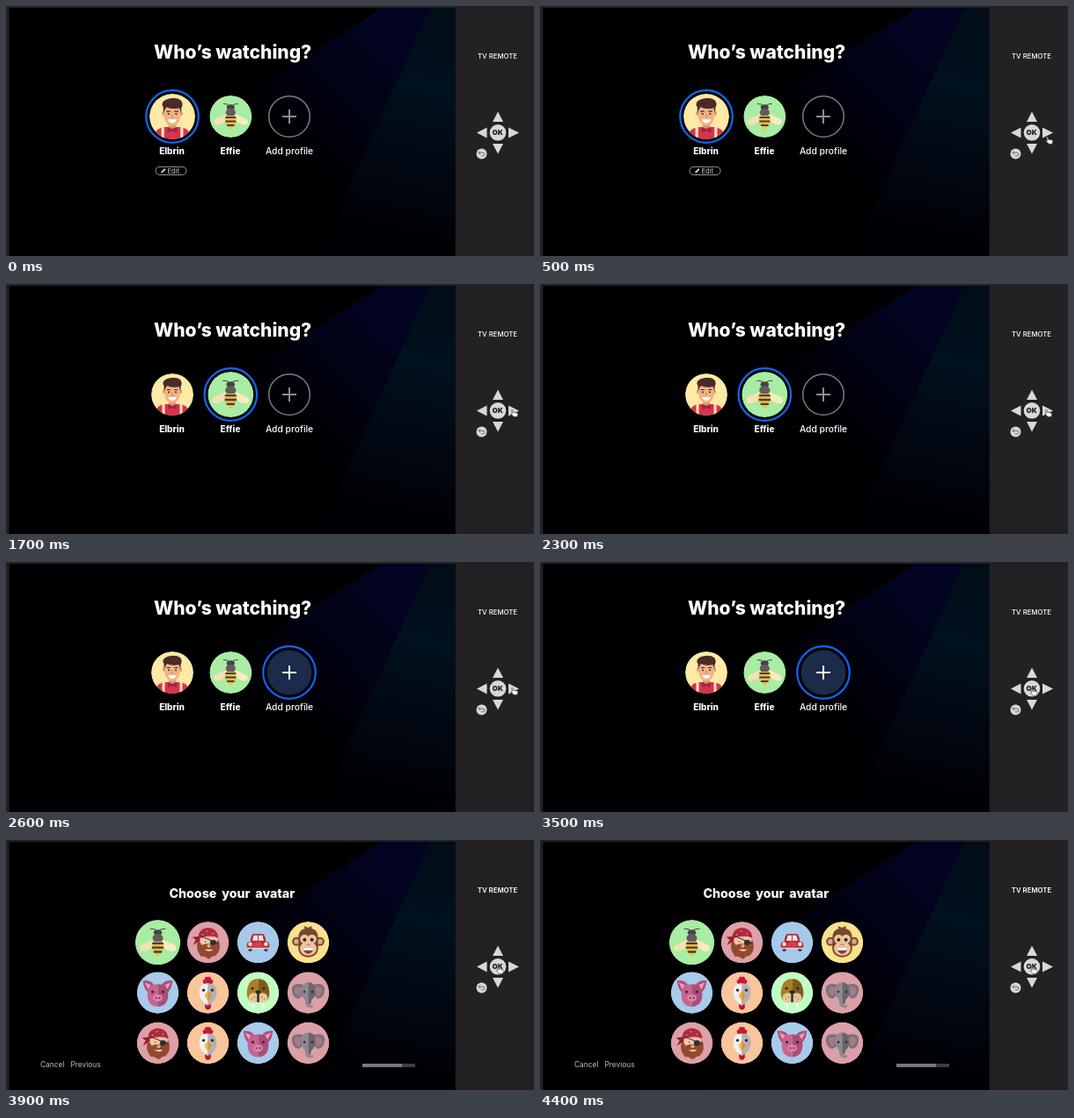
Write an HTML page that moves like this. It is 600 by 285 pixels and loops after 4500 ms.

```html
<!DOCTYPE html>
<html lang="en">
<head>
<meta charset="utf-8">
<title>Profile picker</title>
<style>
  html, body { margin: 0; width: 100%; height: 100%; overflow: hidden; background: #000; }
  svg { display: block; width: 100vw; height: 100vh; }
  text { font-family: Inter, "Open Sans", sans-serif; fill: #fff; }
  .mid { text-anchor: middle; }
  .bold { font-weight: 800; }
</style>
</head>
<body>
<svg viewBox="0 0 600 285">
  <defs>
    <clipPath id="disc"><circle r="24"/></clipPath>
    <linearGradient id="navy" gradientUnits="userSpaceOnUse" x1="455" y1="45" x2="325" y2="170">
      <stop offset="0" stop-color="#020422"/><stop offset=".45" stop-color="#010214"/><stop offset="1" stop-color="#000002"/>
    </linearGradient>
    <linearGradient id="teal" gradientUnits="userSpaceOnUse" x1="500" y1="0" x2="440" y2="270">
      <stop offset="0" stop-color="#010d19"/><stop offset=".35" stop-color="#01111d"/>
      <stop offset=".65" stop-color="#010813"/><stop offset="1" stop-color="#000004"/>
    </linearGradient>
  </defs>

  <rect width="600" height="285" fill="#232124"/>
  <rect x="3.5" y="2.3" width="507" height="283"/>
  <path d="M427 2.3H482L354 285H180L216 136Z" fill="url(#navy)"/>
  <path d="M482 2.3H510.5V285H354Z" fill="url(#teal)"/>

  <g id="profiles">
    <text class="bold" x="168" y="60" font-size="21">Who’s watching?</text>
    <g id="choices"></g>
    <text class="bold mid" x="188.5" y="169" font-size="10">Elbrin</text>
    <text class="bold mid" x="255" y="169" font-size="10">Effie</text>
    <text class="mid" x="322" y="169.3" font-size="10.3" font-weight="500">Add profile</text>
    <g id="edit">
      <rect x="170" y="183.3" width="35" height="9.2" rx="4.6" fill="none" stroke="#aaa" stroke-width=".9"/>
      <path d="M176 190.5l.6-2 3.5-3.5 1.4 1.4-3.5 3.5z" fill="#ccc"/>
      <text x="183.6" y="190.7" font-size="7.5" style="fill:#ccc">Edit</text>
    </g>
  </g>

  <g id="avatars">
    <text class="bold" x="185.5" y="66" font-size="14.2" word-spacing="2.8">Choose your avatar</text>
    <g id="grid"></g>
    <g font-size="8.4" opacity=".75"><text x="39" y="259.3">Cancel</text><text x="73.5" y="259.3">Previous</text></g>
    <path d="M405 257H465" stroke="#3d3d43" stroke-width="4"/>
    <path d="M405 257H450" stroke="#77777e" stroke-width="4"/>
  </g>

  <g id="remote" fill="#d8d8d8">
    <text id="caption" class="mid" x="558.5" y="59.5" font-size="7.8">TV REMOTE</text>
    <path d="M559 120.5l6 11.5h-12zM559 168.5l6-11.5h-12zM535 144.5l11.5-6v12zM583 144.5l-12-6v12z"/>
    <circle cx="559" cy="144.3" r="9.3"/>
    <text class="mid" x="558.7" y="147.3" font-size="8" font-weight="900" style="fill:#232124">OK</text>
    <circle cx="540.5" cy="168.5" r="6"/>
    <path d="M539 165.3l-2 2 2 2M537 167.3h5q2 0 2 1.8t-2 1.8h-2" fill="none" stroke="#555" stroke-width=".8"/>
  </g>
  <path id="cursor" d="M-3.4-4q1.2-.6 1.5.8l.5 2 4 .6q1.5.6 1 2l-.7 2.4h-4l-3-3.3q0-1.2 1.6-.4z"
        fill="#fff" stroke="#444" stroke-width=".7"/>
</svg>

<script>
const $ = id => document.getElementById(id);
const ellipse = (x, y, rx, ry, fill) => `<ellipse cx="${x}" cy="${y}" rx="${rx}" ry="${ry}" fill="${fill}"/>`;
const dot = (x, y, r, fill) => ellipse(x, y, r, r, fill);
const shape = (d, fill) => `<path d="${d}" fill="${fill}"/>`;
const line = (d, color, width = 1) =>
  `<path d="${d}" fill="none" stroke="${color}" stroke-width="${width}" stroke-linecap="round"/>`;
const box = (x, y, w, h, fill, r = 0) =>
  `<rect x="${x}" y="${y}" width="${w}" height="${h}" rx="${r}" fill="${fill}"/>`;
const pair = (x, y, r, fill) => dot(-x, y, r, fill) + dot(x, y, r, fill);

// Each portrait fills a disc of radius 24 around the origin.
const portraits = {
  man: ['#fdeaa6',
    shape('M-18 24V18Q-17 12-8 11H8Q17 12 18 18V24Z', '#d63450') +
    line('M-10 11V24M10 11V24', '#f7e3b4', 3) +
    shape('M-4 5H4V11L0 14-4 11Z', '#dc9566') + pair(9, -3, 2.2, '#e5a373') +
    shape('M-8.5-11H8.5V1Q7 9 0 10-7 9-8.5 1Z', '#f1b384') +
    shape('M-9.5-3V-10Q-13-15-6-18 4-21 9-17 12-13 9.5-9V-3L7.5-9Q0-7-6-10L-8-7Z', '#4a2a28') +
    line('M-6-5.5h3.5M2.5-5.5H6', '#4a2a28', 1.1) + pair(4, -2.8, 1, '#3a2528') +
    line('M0-2V1', '#d48c62', 1.2) + shape('M-5 3H5Q3 7 0 7-3 7-5 3Z', '#fff') +
    shape('M-5 11L0 13 5 11V17L0 15-5 17Z', '#a7233d')],
  bee: ['#a8eda3',
    shape('M-3-4L-18 3Q-21 6-18 9-11 11-4 3Z', '#f3e3b2') +
    shape('M3-4L18 3Q21 6 18 9 11 11 4 3Z', '#f8ebc2') +
    line('M-1.5-12Q-3-15-8-14.5M1.5-12Q3-15 8-14.5', '#474249', 1) +
    ellipse(0, -10.5, 4.5, 3.2, '#474249') + ellipse(0, -4.5, 5.6, 4.6, '#625c5c') +
    shape('M-5.5-1H5.5Q8 6 4 11L0 15-4 11Q-8 6-5.5-1Z', '#efc040') +
    line('M-5 1H5M-5.2 5.5H5.2M-3.4 10H3.4', '#453e43', 2.2)],
  pirate: ['#dd9fa8',
    shape('M-9-6H10V6H-9Z', '#f2c6a0') +
    shape('M-11-3L-7 3Q0 0 8 3L12-3Q15 6 12 11L9 15 5 16 1 19-4 16-8 16-11 11Q-14 5-11-3Z', '#94492c') +
    shape('M-11-4Q-12-15-1-17 11-17 12-5Q2-10-11-4Z', '#b02a3c') +
    shape('M-10-7L-18-6-14-3-17 3-9-2Z', '#96202f') +
    [[-6, -9], [-1, -13], [6, -10]].map(([x, y]) => dot(x, y, .9, '#d9808a')).join('') +
    line('M-8-7L12 1', '#2f2930', 1) + ellipse(6, 0, 3.6, 3.2, '#2f3038') +
    dot(-3, -1, 1.6, '#fff') + dot(-3, -1, .9, '#30272a') + dot(1, 4, 2, '#e5a982') +
    shape('M-4 8H6Q2 12-4 8Z', '#f3dccb')],
  car: ['#a6c9e9',
    box(-11, 4, 4, 6, '#33343c', 1) + box(7, 4, 4, 6, '#33343c', 1) +
    shape('M-9-1Q-8-10-5-10H5Q8-10 9-1L12 0Q14 3 12 7H-12Q-14 3-12 0Z', '#bd2833') +
    shape('M-6.5-2L-5-8H5L6.5-2Z', '#dfeaf0') + line('M0-8V-2', '#bd2833') +
    shape('M-6 5Q-5-1 0-1 5-1 6 5Z', '#d8404a') + pair(9, 2, 2.3, '#f4ead6') +
    line('M-12 6.7H12', '#d9dadd', 1.5)],
  monkey: ['#fae18e',
    pair(13.5, -1, 5, '#75492f') + pair(13.5, -1, 3, '#dca981') +
    shape('M-11 0Q-13-14-4-16L-5-19 0-17 4-19 4-16Q13-14 11 0 14 16 0 17-14 16-11 0Z', '#75492f') +
    pair(4.2, -4, 5.2, '#efc49b') + ellipse(0, 7, 9.5, 8.2, '#efc49b') +
    pair(4.2, -3, 2, '#2f2528') + pair(1.3, 2.5, .7, '#75492f') +
    shape('M-6 6H6Q5 13 0 13-5 13-6 6Z', '#8b3a35') + shape('M-6 6H6L5 9H-5Z', '#fff')],
  pig: ['#a7cbea',
    shape('M-17-14Q-7-15-4-8L-11 0Q-16-4-17-14ZM17-14Q7-15 4-8L11 0Q16-4 17-14Z', '#b04f7b') +
    shape('M-15-12L-8-9-11-4ZM15-12L8-9 11-4Z', '#e4a0b9') +
    shape('M0-10Q-12-10-12 3-11 16 0 16Z', '#c8638f') + shape('M0-10Q12-10 12 3 11 16 0 16Z', '#a94d79') +
    pair(6, -1, 1.7, '#40283d') + ellipse(0, 6, 5.5, 4.2, '#d985a7') + pair(2, 6, 1.1, '#6f3355')],
  chicken: ['#f8c59c',
    shape('M-4-9Q-8-15-4-15-3-20 0-18 3-20 4-15 8-15 4-9Z', '#c5183a') +
    ellipse(0, 15, 3.4, 4.5, '#b81434') +
    shape('M0-11Q-10-11-10 0-10 9 0 15Z', '#f1f0ef') + shape('M0-11Q10-11 10 0 10 9 0 15Z', '#b3b1b3') +
    shape('M0-3L-4 3 0 10Z', '#f2b53d') + shape('M0-3L4 3 0 10Z', '#d9932c') + pair(5, -3, 1.6, '#32292d')],
  walrus: ['#c0ffc4',
    shape('M0-16Q-12-16-13 0-13 7-9 10H0Z', '#ab7d22') + shape('M0-16Q12-16 13 0 13 7 9 10H0Z', '#805a18') +
    box(-7, 8, 2.5, 11, '#f4f4ea', 1) + box(4.5, 8, 2.5, 11, '#f4f4ea', 1) +
    pair(5.2, 6, 5.8, '#e6c79c') + box(-1.2, -2, 2.4, 13, '#30282a') + ellipse(0, -1, 3, 2, '#30282a') +
    pair(6.5, -5, 1.5, '#30282a') + pair(4, 5, .6, '#74502a') + pair(7, 7, .6, '#74502a')],
  elephant: ['#dd9fa7',
    shape('M-5-9Q-18-13-19-4-18 6-11 7L-6 3ZM5-9Q18-13 19-4 18 6 11 7L6 3Z', '#77747a') +
    shape('M-7-6Q-15-9-16-3-15 3-10 4ZM7-6Q15-9 16-3 15 3 10 4Z', '#a97886') +
    shape('M0-12Q-8-12-8-2-8 5-4 8L-3 14Q-1 18 5 17L6 14Q1 15 0 11Z', '#8d8a90') +
    shape('M0-12Q8-12 8-2 8 5 4 8L3 12Q1 15 0 11Z', '#68656b') +
    pair(4.5, -1, 1.3, '#302a30')],
};

const portrait = (name, x, y, r = 24) => {
  const [fill, art] = portraits[name];
  return `<g transform="translate(${x} ${y}) scale(${r / 24})" clip-path="url(#disc)">${dot(0, 0, 24, fill)}${art}</g>`;
};

const addButton = (x, y, selected) =>
  `<circle cx="${x}" cy="${y}" r="${selected ? 25.5 : 23.3}" fill="${selected ? '#1b2b49' : 'none'}"
    stroke="#777b84" stroke-width="${selected ? 0 : 1.5}"/>` +
  `<path d="M${x - 8} ${y}h16M${x} ${y - 8}v16" stroke="${selected ? '#fff' : '#8b8d93'}" stroke-width="2"/>`;

function drawChoices(selected) {
  const xs = [189, 255.3, 322], y = 126;
  const radius = i => i === selected ? 26 : 24;
  return portrait('man', xs[0], y, radius(0)) + portrait('bee', xs[1], y, radius(1)) +
    addButton(xs[2], y, selected === 2) +
    `<circle cx="${xs[selected]}" cy="${y}" r="29.8" fill="none" stroke="#0f68f5" stroke-width="2.2"/>`;
}

$('grid').innerHTML = 'bee pirate car monkey pig chicken walrus elephant pirate chicken pig elephant'.split(' ')
  .map((name, i) => portrait(name, 172.5 + i % 4 * 57, 116.8 + Math.floor(i / 4) * 57.3, i ? 23.8 : 25.7)).join('');

const LOOP = 4500, STEP = 100;
const start = [592, 222], rightKey = [578, 147.5], okKey = [561.5, 148.5];
const progress = (t, from, to) => Math.min(1, Math.max(0, (t - from) / (to - from)));
const mix = (a, b, k) => a.map((v, i) => v + (b[i] - v) * k);
const easeOut = k => 1 - (1 - k) ** 3;
const easeInOut = k => k * k * (3 - 2 * k);
const show = (id, on) => $(id).style.display = on ? '' : 'none';

let shownChoice = -1;

function render(now) {
  const t = Math.floor(now % LOOP / STEP) * STEP;
  const choice = t < 1700 ? 0 : t < 2500 ? 1 : 2;
  const choosing = t < 3600;
  if (choice !== shownChoice) $('choices').innerHTML = drawChoices(shownChoice = choice);
  show('profiles', choosing);
  show('avatars', !choosing);
  show('edit', choice === 0);
  $('caption').setAttribute('font-weight', choosing ? 500 : 600);
  $('caption').setAttribute('y', choosing ? 59.5 : 60);

  const spot = t < 2700
    ? mix(start, rightKey, easeOut(progress(t, 100, 800)))
    : mix(rightKey, okKey, easeInOut(progress(t, 2700, 3300)));
  show('cursor', t >= 100);
  $('cursor').setAttribute('transform', `translate(${spot})`);
  requestAnimationFrame(render);
}
render(performance.now());
</script>
</body>
</html>
```
